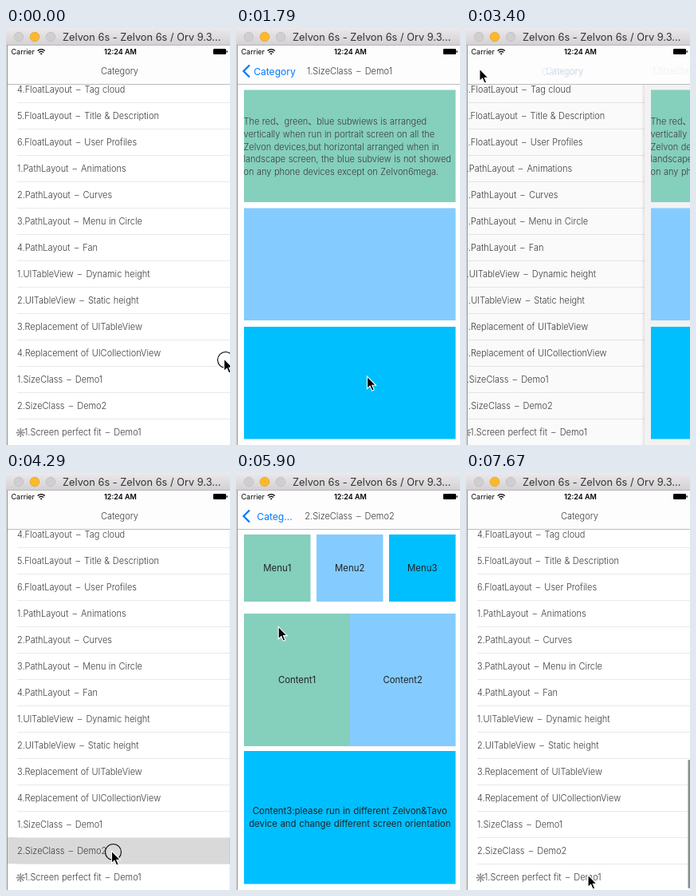
These frames come from a looping animation (281 by 522 pixels, 8000 ms). An HTML page:

```html
<!DOCTYPE html>
<html lang="en">
<head>
<meta charset="utf-8">
<title>Layout demos</title>
<style>
  html, body { margin: 0; width: 100%; height: 100%; overflow: hidden; background: #fff; }
  svg { display: block; width: 281px; height: 522px; }
  text { font: 300 11px Inter, "Open Sans", sans-serif; fill: #3c3c3c; white-space: pre; word-spacing: .4px; }
  .dash { word-spacing: 2px; }
  .mid { text-anchor: middle; }
  .back { font-size: 12.1px; font-weight: 400; fill: #007aff; }
  .status { font-size: 9px; font-weight: 400; fill: #000; word-spacing: 0; }
  .bold { font-weight: 600; }
  .window { font-size: 12.8px; font-weight: 400; fill: #333; word-spacing: 0; }
  .flower { font: 15px "DejaVu Sans", sans-serif; fill: #8a8a8a; }
  .dark text { fill: #222; font-size: 11.4px; font-weight: 400; }
  .green { fill: #85cfbd; }
  .sky { fill: #84ccff; }
  .deep { fill: #00bfff; }
</style>
</head>
<body>
<svg viewBox="0 0 281 522">
  <defs>
    <linearGradient id="chrome" x2="0" y2="1">
      <stop stop-color="#ebe9eb"/><stop offset="1" stop-color="#d2d0d2"/>
    </linearGradient>
    <linearGradient id="edge">
      <stop stop-color="#000" stop-opacity="0"/><stop offset="1" stop-color="#000" stop-opacity=".1"/>
    </linearGradient>
  </defs>

  <g id="list">
    <rect x="2" y="70" width="281" height="452" fill="#fff"/>
    <rect id="pressed" x="2" width="281" height="33" fill="#d9d9d9"/>
    <g id="rows"></g>
  </g>
  <rect id="dim" x="2" y="70" width="281" height="452"/>
  <rect id="bar" x="278.5" y="359" width="2.5" height="161" rx="1.2" fill="#8c8c8c"/>

  <g id="page">
    <rect id="shadow" x="-2" y="70" width="4" height="452" fill="url(#edge)"/>
    <rect id="paper" x="2" y="70" width="281" height="452"/>
    <g id="demo1">
      <rect class="green" x="10" y="77.5" width="265.5" height="140.5"/>
      <rect class="sky" x="10" y="225.5" width="265.5" height="140.5"/>
      <rect class="deep" x="10" y="374" width="265.5" height="140.5"/>
      <g id="intro"></g>
    </g>
    <g id="demo2" class="dark"></g>
  </g>

  <g id="nav">
    <rect x="2" y="22" width="279" height="48" fill="#fdfdfd"/>
    <rect x="2" y="70" width="279" height="1" fill="#bcbcbc"/>
    <text id="home" class="mid" x="142.5" y="58">Category</text>
    <path id="chevron" d="M17 46.5 9.5 54 17 61.5" fill="none" stroke="#007aff" stroke-width="2.2"/>
    <text id="back" class="back mid" x="48.5" y="58.5"></text>
    <g id="title"></g>
    <text class="status" x="6.5" y="33">Carrier</text>
    <path d="M39.6 28.6Q44.2 24.6 48.8 28.6M41.3 30.6Q44.2 28.2 47.1 30.6" fill="none" stroke="#000" stroke-width="1.3"/>
    <path d="M42.7 32Q44.2 30.9 45.7 32L44.2 33.6Z"/>
    <text class="status bold mid" x="143.5" y="33">12:24 AM</text>
    <rect x="260" y="26" width="16" height="7" rx="1.3"/>
    <rect x="276.5" y="28.2" width="1.3" height="2.6" rx=".6"/>
  </g>

  <g id="frame">
    <rect y="22" width="1" height="500" fill="#e6e6e6"/>
    <rect x="1" y="22" width="1" height="500" fill="#8f8f8f"/>
    <rect width="281" height="22" fill="url(#chrome)"/>
    <rect y="21" width="281" height="1" fill="#b9b7b9"/>
    <g stroke-width=".7">
      <circle cx="16" cy="11" r="5.8" fill="#d0ced0" stroke="#bcbabc"/>
      <circle cx="36" cy="11" r="5.8" fill="#fdb92c" stroke="#e0a01f"/>
      <circle cx="56" cy="11" r="5.8" fill="#d0ced0" stroke="#bcbabc"/>
    </g>
    <text class="window" x="71" y="16">Zelvon 6s - Zelvon 6s / Orv 9.3...</text>
  </g>

  <g id="cursor">
    <circle id="ring" cx="2" cy="1.5" r="10" fill="none" stroke="#000" stroke-width="1.1"/>
    <path d="M0 0V15.5L3.6 12.2 6.1 18 8.7 16.9 6.3 11.3H11Z" stroke="#fff" stroke-width="1.1"/>
  </g>
</svg>
<script>
const $ = id => document.getElementById(id);
const LOOP = 8000, TICK = 178.4, WIDTH = 281;

const names = [
  "4.FloatLayout – Tag cloud", "5.FloatLayout – Title & Description", "6.FloatLayout – User Profiles",
  "1.PathLayout – Animations", "2.PathLayout – Curves", "3.PathLayout – Menu in Circle", "4.PathLayout – Fan",
  "1.UITableView – Dynamic height", "2.UITableView – Static height",
  "3.Replacement of UITableView", "4.Replacement of UICollectionView",
  "1.SizeClass – Demo1", "2.SizeClass – Demo2", "1.Screen perfect fit – Demo1"
];
const intro = [
  "The red、green、blue subwiews is arranged", "vertically when run in portrait screen on all the",
  "Zelvon devices,but horizontal arranged when in", "landscape screen, the blue subview is not showed",
  "on any phone devices except on Zelvon6mega."
];

function add(parent, tag, attrs, label) {
  const el = document.createElementNS("http://www.w3.org/2000/svg", tag);
  for (const key in attrs) el.setAttribute(key, attrs[key]);
  if (label) el.textContent = label;
  return parent.appendChild(el);
}

// A heading sets its dash with wider spaces around it.
function heading(parent, attrs, label) {
  const el = add(parent, "text", attrs), [head, tail] = label.split(" – ");
  add(el, "tspan", {}, head);
  if (tail) {
    add(el, "tspan", { class: "dash" }, " – ");
    add(el, "tspan", {}, tail);
  }
  return el;
}

names.forEach((name, i) => {
  const y = 81 + 33 * i, last = i === names.length - 1;
  if (last) add($("rows"), "text", { class: "flower", x: 12, y: y + 1.5 }, "❋");
  heading($("rows"), { x: last ? 23 : 14, y }, name);
  add($("rows"), "rect", { x: 14, y: y + 12, width: 269, height: 1, fill: "#e9e9e9" });
});
intro.forEach((line, i) => add($("intro"), "text", { x: 9.5, y: 121 + 15.8 * i }, line));
const titles = names.slice(11, 13).map(name => heading($("title"), { class: "mid", x: 142.5, y: 58 }, name));

function box(color, x, y, width, height, ...lines) {
  add($("demo2"), "rect", { class: color, x, y, width, height });
  lines.forEach((line, i) => add($("demo2"), "text", {
    class: "mid", x: x + width / 2, y: y + height / 2 + 4 + 16 * (i - (lines.length - 1) / 2)
  }, line));
}
box("green", 10, 77, 83.5, 84, "Menu1");
box("sky", 101, 77, 83.5, 84, "Menu2");
box("deep", 192, 77, 83.5, 84, "Menu3");
box("green", 10, 176, 133, 166, "Content1");
box("sky", 143, 176, 132.5, 166, "Content2");
box("deep", 10, 348, 265.5, 166.5, "Content3:please run in different Zelvon&Tavo",
  "device and change different screen orientation");

// Keys are [tick, value, ...]; values are interpolated linearly.
const slide = [[0, 1], [6, 1], [7, .999], [8, .5], [9, .04], [10, 0], [18, 0], [19, .79], [20, .98], [21, 1],
  [23, 1], [25, .999], [26, .3], [27, .014], [28, 0], [36, 0], [37, .555], [38, .93], [39, 1]];
const pointer = [[0, 273.5, 414], [6, 164, 435.5], [10, 164.5, 436], [11, 164.5, 436], [17, 17, 51], [20, 17, 51],
  [23, 132.5, 473], [29, 132.5, 473], [35, 13.5, 52], [37, 13.5, 52], [42, 150, 530], [43, 153, 503]];

function at(keys, k) {
  const j = keys.findIndex(key => key[0] > k);
  if (j < 0) return keys[keys.length - 1].slice(1);
  const a = keys[j - 1], b = keys[j], u = (k - a[0]) / (b[0] - a[0]);
  return a.slice(1).map((v, i) => v + (b[i + 1] - v) * u);
}
const move = (id, x, y = 0) => $(id).setAttribute("transform", `translate(${x} ${y})`);
const show = (el, o) => el.setAttribute("opacity", Math.max(0, Math.min(1, o)));
const fade = (id, o) => show($(id), o);

function draw(time) {
  const k = Math.floor((time % LOOP + 6) / TICK);
  const [p] = at(slide, k), first = k < 22, moving = p > 0 && p < 1;
  const popping = (k > 18 && k < 22) || k > 36;

  move("list", -84 * (1 - p));
  move("page", WIDTH * p);
  fade("page", p < 1 ? 1 : 0);
  fade("dim", .1 * (1 - p));
  fade("shadow", moving ? 1 : 0);
  $("paper").setAttribute("fill", popping ? `hsl(0 0% ${91 + 5 * p}%)` : "#fff");
  fade("paper", p === 0 || popping ? 1 : 0);
  fade("demo1", first ? 1 : 0);
  fade("demo2", first ? 0 : 1);

  const row = k >= 7 && k < 18 ? 11 : k >= 24 && k < 36 ? 12 : -1;
  fade("pressed", row < 0 ? 0 : 1);
  $("pressed").setAttribute("y", 60 + 33 * row);
  fade("bar", k > 40 ? 1 : 0);

  $("back").textContent = first ? "Category" : "Categ...";
  show(titles[0], first ? 1 : 0);
  show(titles[1], first ? 0 : 1);
  move("back", (first ? 92 : 77) * p);
  move("title", (first ? 183 : 175) * p);
  move("home", -90 * (1 - p));
  fade("back", (1 - p) ** 1.4);
  fade("title", (1 - p) ** 1.7);
  fade("home", (p - .75) * 4);
  fade("chevron", 1 - 2.5 * p);

  move("cursor", ...at(pointer, k));
  fade("ring", [0, 7, 18, 24, 37].includes(k) ? 1 : 0);
}

const start = performance.now();
function tick() {
  draw(performance.now() - start);
  requestAnimationFrame(tick);
}
draw(0);
requestAnimationFrame(tick);
</script>
</body>
</html>
```
